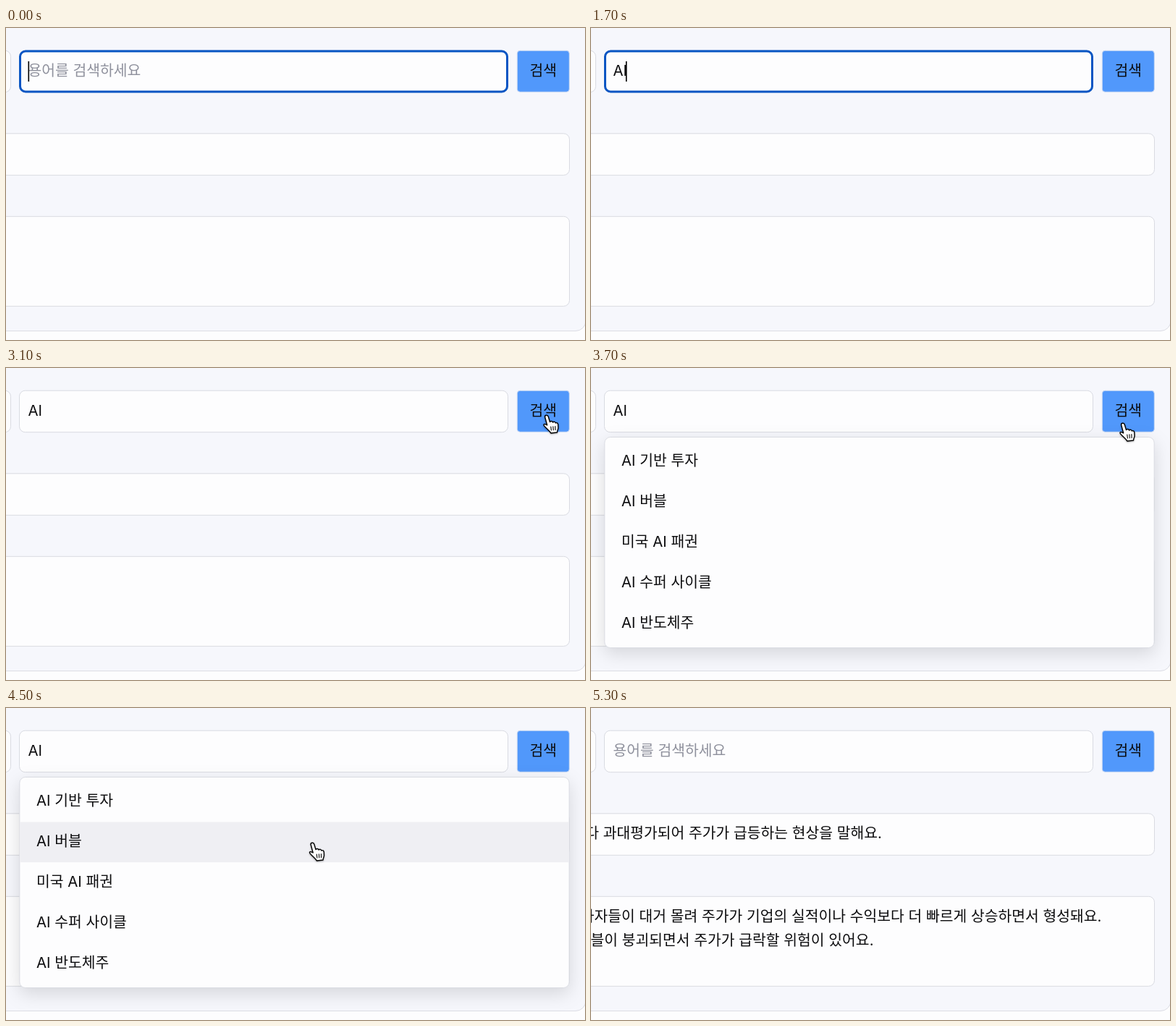
Animation, 800 px wide and 431 px high, one loop 6400 ms. Source, as an HTML page:

```html
<!DOCTYPE html>
<html lang="ko">
<head>
<meta charset="utf-8">
<title>용어 검색</title>
<style>
  html, body { margin: 0; height: 100%; overflow: hidden; background: #fdfdfe; }
  svg { display: block; width: 800px; height: 431px; }
  text { font: 20.4px Inter, "Noto Sans CJK KR", "Noto Sans CJK", sans-serif; fill: #0c0c0e; }
  .panel { fill: #f6f7fc; stroke: #dcdde4; }
  .box { fill: #fdfdfe; stroke: #d9dbe2; }
  .button { fill: #5198fb; stroke: #c9d9f3; }
  .hint { fill: #8f919d; }
  .end { text-anchor: end; }
  #focus { fill: none; stroke: #0755c3; stroke-width: 3; }
  #caret { fill: #000; }
  #menu .box { filter: drop-shadow(0 8px 12px rgba(0, 0, 0, .13)); }
  #hover { fill: #efeff3; }
  #hand { fill: #fff; stroke: #000; stroke-width: 1.4; stroke-linejoin: round; stroke-linecap: round;
    filter: drop-shadow(0 1px 1px rgba(0, 0, 0, .3)); }
</style>
</head>
<body>
<svg viewBox="0 0 800 431">
  <rect class="panel" x="-40" y="-40" width="841" height="458.5" rx="14"/>
  <rect class="box" x="-40" y="31.2" width="46.5" height="57.5" rx="8"/>
  <rect class="box" x="18.5" y="31.2" width="675" height="57.5" rx="8"/>
  <rect class="box" x="-40" y="145.8" width="818.5" height="57.5" rx="8"/>
  <rect class="box" x="-40" y="260.3" width="818.5" height="124" rx="8"/>
  <rect class="button" x="706.3" y="31.3" width="72" height="57" rx="4"/>
  <text x="742.3" y="65.5" text-anchor="middle">검색</text>

  <rect id="focus" x="19.5" y="32" width="673" height="56" rx="7.5"/>
  <text id="hint" class="hint" x="30.5" y="65.5">용어를 검색하세요</text>
  <text id="query" x="30.5" y="65.5"></text>
  <rect id="caret" y="46" width="1.6" height="28"/>

  <g id="results">
    <text class="end" x="402" y="180">기업의 실제 가치보다 과대평가되어 주가가 급등하는 현상을 말해요.</text>
    <text class="end" x="705.5" y="294.5">투자자들이 대거 몰려 주가가 기업의 실적이나 수익보다 더 빠르게 상승하면서 형성돼요.</text>
    <text class="end" x="390.5" y="328.3">버블이 붕괴되면서 주가가 급락할 위험이 있어요.</text>
  </g>

  <g id="menu">
    <rect class="box" x="18.8" y="95.5" width="759.4" height="291" rx="8"/>
    <rect id="hover" x="19.3" y="157.5" width="758.4" height="55.7"/>
  </g>

  <g id="hand">
    <path d="M-2.4 1.5C-2.6-1.2 1.4-1.6 2.3 1.2L4.5 8.5C5.4 7 8 7 8.6 9C10 7.8 12 8.2 12.3 10C14 9 15.4 10 15.8 12L16 16.5C16 19 14.5 20 14.5 23L6 24C4 21 1 18.5-2 15.5C-5 13-4.4 11-2 11.6L.7 13Z"/>
    <path d="M5.8 15l.6 5M8.9 14.8l.4 5M11.9 14.6l.2 5" fill="none" stroke-width="1.1"/>
  </g>
</svg>
<script>
  const LOOP = 6400, STEP = 100;
  const $ = id => document.getElementById(id);
  const show = (id, on) => $(id).style.visibility = on ? 'visible' : 'hidden';
  const within = (t, ...spans) => spans.some(([from, to]) => t >= from && t < to);

  // Pointer stops: time, x, y
  const stops = [
    [2500, 560, 72], [2800, 743, 71], [3100, 747, 66], [3600, 747, 66],
    [3700, 735, 77], [4300, 423.5, 187], [5000, 423.5, 187], [5200, 621, 372]
  ];

  ['AI 기반 투자', 'AI 버블', '미국 AI 패권', 'AI 수퍼 사이클', 'AI 반도체주'].forEach((label, i) => {
    const item = document.createElementNS('http://www.w3.org/2000/svg', 'text');
    item.setAttribute('x', 42);
    item.setAttribute('y', 135.4 + 55.8 * i);
    item.textContent = label;
    $('menu').append(item);
  });

  function pointerAt(t) {
    const next = stops.findIndex(stop => stop[0] > t);
    if (next < 1) return stops[next < 0 ? stops.length - 1 : 0].slice(1);
    const [t0, x0, y0] = stops[next - 1], [t1, x1, y1] = stops[next];
    const p = (t - t0) / (t1 - t0), e = p * p * (3 - 2 * p);
    return [x0 + (x1 - x0) * e, y0 + (y1 - y0) * e];
  }

  function render(now) {
    const t = Math.floor(now % LOOP / STEP) * STEP;
    const query = within(t, [1500, 4700]) ? (t < 1600 ? 'A' : 'AI') : '';
    $('query').textContent = query;
    $('caret').setAttribute('x', [30.5, 44.3, 48][query.length]);
    show('hint', !query);
    show('focus', t < 3100);
    show('caret', within(t, [0, 400], [800, 1200], [1500, 2100], [2400, 3100]));
    show('menu', within(t, [3200, 4700]));
    show('hover', within(t, [4400, 4700]));
    show('results', t >= 4700);
    show('hand', within(t, [2500, 5300]));
    $('hand').setAttribute('transform', `translate(${pointerAt(t)})`);
    requestAnimationFrame(render);
  }
  render(performance.now());
</script>
</body>
</html>
```
